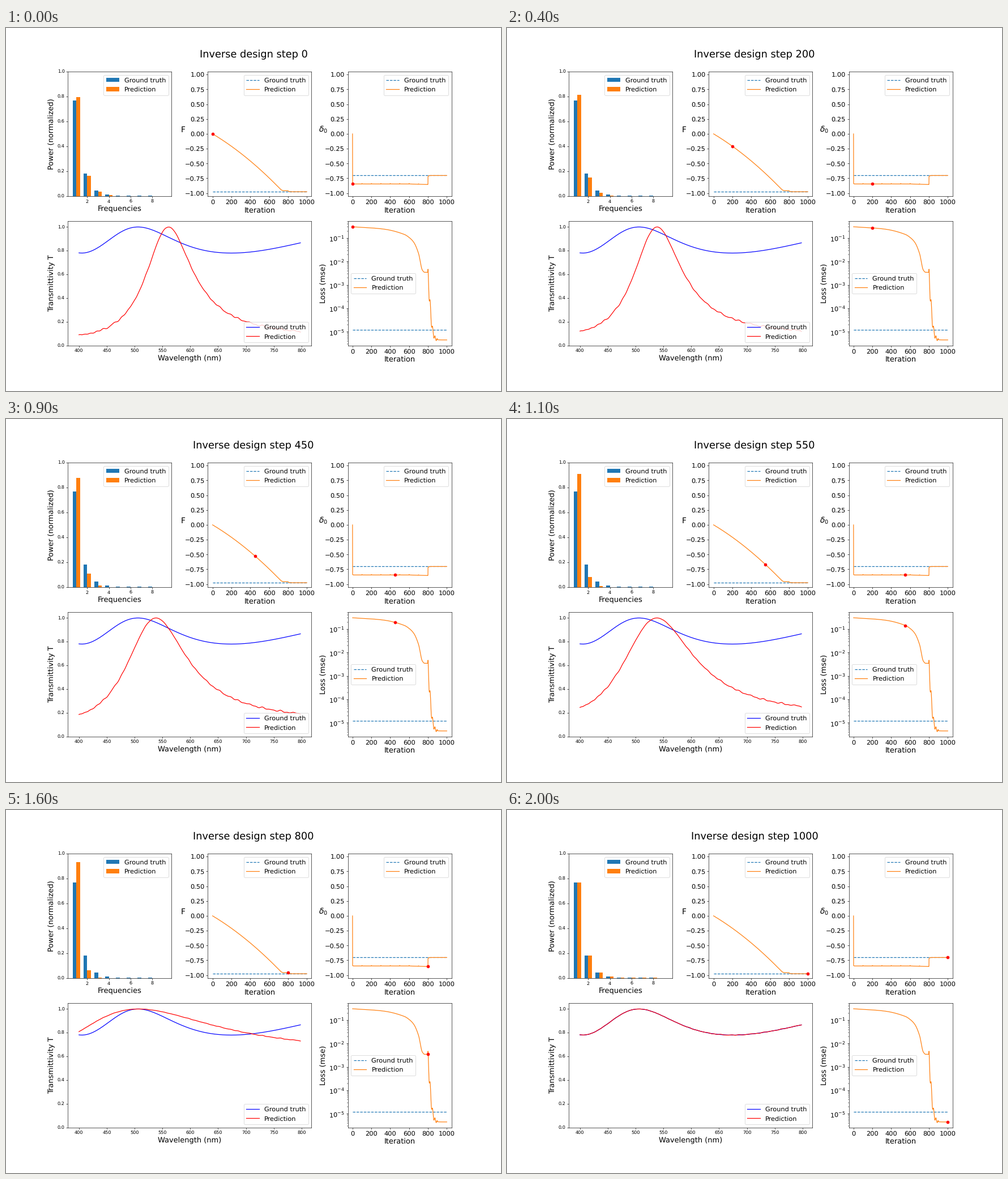
Recreate the animation shown at these times as a matplotlib script. Size 874x641 px, loop 2100 ms.

```python
import numpy as np
import matplotlib.pyplot as plt
from matplotlib.animation import FuncAnimation

DPI = 58.25
plt.rcParams.update({"font.family": "DejaVu Sans", "font.size": 10,
                     "text.hinting": "none", "legend.fontsize": 14,
                     "legend.labelspacing": .53, "axes.labelsize": 16})


def smooth(xs, ys, x):
    """Monotone cubic curve through a few points."""
    xs, ys = np.array(xs, float), np.array(ys, float)
    x = np.clip(x, xs[0], xs[-1])
    h = np.diff(xs)
    d = np.diff(ys) / h
    rising = d[:-1] * d[1:] > 0
    inner = np.where(rising, 2 * d[:-1] * d[1:] / np.where(rising, d[:-1] + d[1:], 1), 0)
    m = np.concatenate([d[:1], inner, d[-1:]])
    i = np.clip(np.searchsorted(xs, x, side="right") - 1, 0, len(h) - 1)
    t = (x - xs[i]) / h[i]
    return ((1 + 2 * t) * (1 - t) ** 2 * ys[i] + t * (1 - t) ** 2 * h[i] * m[i]
            + t * t * (3 - 2 * t) * ys[i + 1] + t * t * (t - 1) * h[i] * m[i + 1])


# Optimisation histories; a second phase begins at iteration 800
it = np.arange(1001)
late = np.maximum(it - 800, 0)

descent = it * (.00095 + 4.8e-7 * it)
force = .012 * np.logaddexp(-descent / .012, -.959 / .012) - .0165 * (1 - np.exp(-late / 8))

delta = -.845 + .01 * np.exp(-it / 3) - .009 * np.clip((it - 600) / 200, 0, 1)
delta += .007 * np.exp(-(it % 100) / 4) * (it >= 100)
delta = np.where(late > 0, -.702 - .022 * np.exp(-late / 6), delta)
delta[0] = 0

log_loss = smooth([0, 200, 350, 550, 600, 650, 700, 740, 765, 800],
                  [-.515, -.563, -.625, -.842, -.97, -1.18, -1.65, -2.36, -2.46, -2.46], it)
ringing = .45 * np.exp(-late / 45) * np.cos(2 * np.pi * late / 25)
settle = -5.35 + 2.61 * np.exp(-(late / 33) ** 1.5) + ringing * (late < 100)
loss = 10 ** np.where(late > 0, settle, log_loss)

# Etalon spectra: transmission peaks at a wavelength, contrast follows F
wl = np.arange(400, 800, 2)
rng = np.random.default_rng(4)
ripple = sum(np.sin(2 * np.pi * wl / p + rng.uniform(0, 6.28)) for p in (11, 15, 19, 27)) / 2


def etalon(peak, contrast, rate):
    return 1 / (1 + contrast * np.sin(1000 * rate * (1 / wl - 1 / peak)) ** 2)


def spectrum(step):
    peak = smooth([0, 10, 600, 700, 750, 800, 850], [561, 539, 538, 528, 512, 507, 506], step)
    rate = smooth([0, 650, 800, 850], [1.76, 1.76, 1.5, 3.193], step)
    t = etalon(peak, 11.5 * (1 + force[step]), rate)
    return np.minimum(t + .006 * (1.1 - t) * ripple, 1)


# Geometric power distribution over the harmonics
n = np.arange(1, 10)


def powers(ratio, floor):
    return (1 - ratio) * ratio ** (n - 1) + floor * (n < 9)


def predicted_powers(step):
    ratio = smooth([0, 200, 350, 550, 700, 800, 850],
                   [.207, .185, .155, .092, .048, .07, .235], step)
    return powers(ratio, .002 * (step > 800))


# Figure
fig = plt.figure(figsize=(874.001 / DPI, 641.001 / DPI), dpi=DPI, facecolor="white")
grid = fig.add_gridspec(2, 3, left=.125, right=.9, bottom=.125, top=.88,
                        wspace=.35, hspace=.2)
title = fig.suptitle("Inverse design step 0", fontsize=22, y=.94)


def panel(cell, xlabel, ylabel, **kw):
    ax = fig.add_subplot(cell)
    ax.set_xlabel(xlabel)
    ax.set_ylabel(ylabel, **kw)
    return ax


def history(cell, ylabel, values, goal, loc, **kw):
    ax = panel(cell, "Iteration", ylabel, **kw)
    ax.plot([0, 1000], [goal, goal], "--", color="C0", label="Ground truth")
    ax.plot(it, values, color="C1", label="Prediction")
    dot, = ax.plot([0], [values[1]], "ro")
    ax.set_xlim(-50, 1050)
    ax.set_xticks(range(0, 1001, 200))
    ax.tick_params(labelsize=14)
    ax.legend(loc=loc)
    return ax, dot


ax = panel(grid[0, 0], "Frequencies", "Power (normalized)")
ax.bar(n - .175, powers(.235, .002), .35, label="Ground truth")
bars = ax.bar(n + .175, predicted_powers(0), .35, label="Prediction")
ax.set_xlim(.215, 9.785)
ax.set_ylim(0, 1)
ax.set_xticks([2, 4, 6, 8])
ax.legend(loc="upper right")

dots = []
for col, name, values, goal in ((1, "F", force, -.974), (2, r"$\delta_0$", delta, -.702)):
    ax, dot = history(grid[0, col], name, values, goal, "upper right", rotation=0)
    ax.yaxis.label.set_size(17)
    ax.set_ylim(-1.05, 1.05)
    ax.set_yticks(np.arange(-1, 1.01, .25))
    dots.append((dot, values))

ax = panel(grid[1, :2], "Wavelength (nm)", "Transmittivity T")
ax.plot(wl, etalon(506, .282, 3.193), "b", label="Ground truth")
curve, = ax.plot(wl, spectrum(0), "r", label="Prediction")
ax.set_xlim(380.1, 817.9)
ax.set_ylim(0, 1.05)
ax.set_yticks(np.arange(0, 1.01, .2))
ax.legend(loc="lower right")

ax, dot = history(grid[1, 2], "Loss (mse)", loss, 10 ** -4.925, "center left")
ax.set_yscale("log")
ax.set_ylim(10 ** -5.593, 10 ** -.27)
dots.append((dot, loss))


def update(frame):
    step = 50 * frame
    title.set_text(f"Inverse design step {step}")
    for bar, height in zip(bars, predicted_powers(step)):
        bar.set_height(height)
    for dot, values in dots:
        dot.set_data([step], [values[max(step, 1)]])
    curve.set_ydata(spectrum(step))
    return [title, curve, *bars, *(dot for dot, _ in dots)]


anim = FuncAnimation(fig, update, frames=21, interval=100, repeat=True,
                     repeat_delay=0, blit=False)
plt.show()
```
